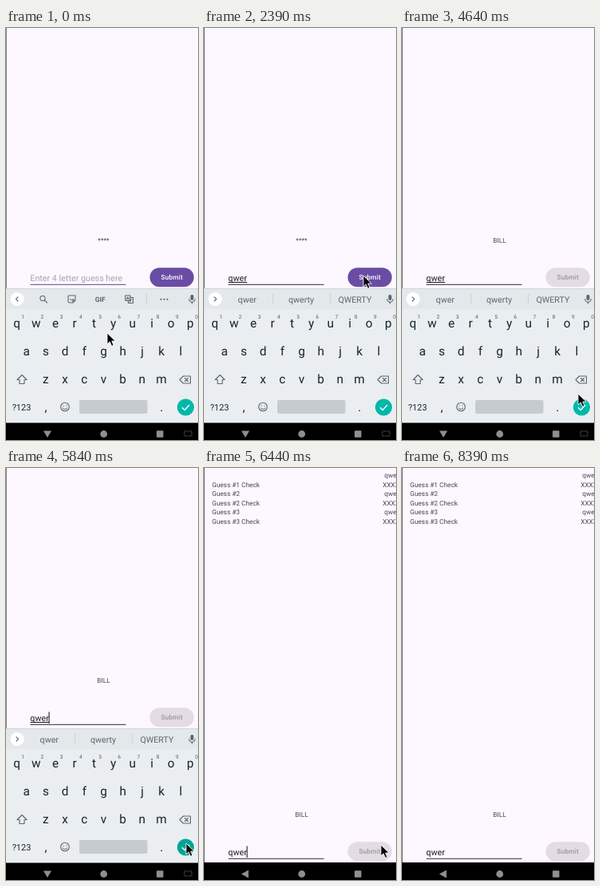
An HTML page that plays this animation: 241 by 516 pixels, repeating every 8540 ms.

```html
<!DOCTYPE html>
<html lang="en">
<head>
<meta charset="utf-8">
<title>Word guess</title>
<style>
html, body { margin: 0; width: 100%; height: 100%; overflow: hidden; background: #000; }
svg { display: block; width: 100vw; height: 100vh; }
text { font-family: Roboto, Arial, sans-serif; text-rendering: geometricPrecision; white-space: pre; }
.mid { text-anchor: middle; }
.small { font-size: 8.3px; fill: #49454f; }
.field { font-size: 10.75px; fill: #1d1b20; }
.key { font-size: 15.4px; fill: #12262f; }
.digit { font-size: 6.6px; fill: #4f5d65; }
.suggest { font-size: 10.7px; fill: #5b676e; }
.icon { fill: none; stroke: #5b676e; stroke-width: 1.1; stroke-linejoin: round; stroke-linecap: round; }
.solid { fill: #5b676e; }
.rule { stroke: #cbd2d6; stroke-width: 1; }
#nav { fill: #8f8f8f; }
</style>
</head>
<body>
<svg viewBox="0 0 241 516" preserveAspectRatio="none">
  <rect width="241" height="516"/>
  <g id="page">
    <rect y="-200" width="241" height="526" fill="#fdf7ff"/>
    <rect y="-200" width="1" height="526" fill="#85818a"/>
    <g id="list"></g>
    <text id="answer" class="small mid" x="122.5" y="269.2"></text>
    <text id="hint" class="field" x="30.3" y="317" style="fill:#a9a3ab">Enter 4 letter guess here</text>
    <text id="guess" class="field" x="30.3" y="317"></text>
    <rect id="compose" x="30.5" y="318" height="1" fill="#1d1b20"/>
    <rect id="caret" y="305.5" width="1.2" height="14.5" fill="#2e2936"/>
    <rect id="line" x="30.5" y="320.8" width="120" height="1.2"/>
    <rect id="button" x="180.5" y="300.3" width="55.3" height="24" rx="12"/>
    <text id="label" class="mid" x="208.2" y="315.2" font-size="8.4" font-weight="500" letter-spacing=".1">Submit</text>
  </g>
  <g id="board">
    <rect y="326.3" width="241" height="168.2" fill="#eaeef1"/>
    <rect y="326.3" width="241" height="26" fill="#e3e8eb"/>
    <circle cx="14" cy="339.5" r="8.6" fill="#fff"/>
    <path id="chevron" class="icon"/>
    <g id="tools">
      <circle class="icon" cx="46" cy="338.6" r="3.1"/>
      <path class="icon" d="M48.4 341l3.2 3.2"/>
      <path class="icon" d="M79.5 335h7.5v6l-3 3h-4.5q-1.5 0-1.5-1.5v-6q0-1.500 1.500-1.500zM87 341h-3v3M80.500 339.500q2 2.500 4 0"/>
      <text class="mid solid" x="118.2" y="342.6" font-size="8.6" font-weight="700">GIF</text>
      <rect class="icon" x="149.800" y="335" width="6" height="6.500"/>
      <path class="icon" d="M156 337.500h3.500v7h-6v-3M151.500 340l1.400-3 1.400 3M155.500 343l2-3.500"/>
      <path class="rule" d="M176.500 333v13"/>
      <circle class="solid" cx="194.500" cy="339.800" r="1.100"/>
      <circle class="solid" cx="198.500" cy="339.800" r="1.100"/>
      <circle class="solid" cx="202.500" cy="339.800" r="1.100"/>
    </g>
    <g id="words">
      <path class="rule" d="M86.500 333v13M158.500 333v13"/>
      <text class="suggest mid" x="54.300" y="343.700"></text>
      <text class="suggest mid" x="122" y="343.700"></text>
      <text class="suggest mid" x="189.500" y="343.700"></text>
    </g>
    <rect class="solid" x="231.500" y="334" width="4" height="7" rx="2"/>
    <path class="icon" d="M229.800 339.500a3.700 3.700 0 0 0 7.400 0M233.500 343.200v2"/>
    <g id="keys"></g>
    <path class="icon" d="M20 434.500l6 6h-3v5h-6v-5h-3z"/>
    <path class="icon" d="M222.500 436h9v9h-9l-4.500-4.500zM224.500 438.500l4 4M228.500 438.500l-4 4"/>
    <text class="mid key" x="19.500" y="479" style="font-size:11px">?123</text>
    <circle class="icon" cx="74" cy="474.500" r="5.300"/>
    <path class="icon" d="M71.500 476q2.500 3 5 0M72.200 472.800v.2M75.800 472.800v.2"/>
    <rect x="92" y="466" width="85.500" height="17" rx="2" fill="#c5cbcf"/>
    <g id="enter"></g>
  </g>
  <g id="nav">
    <path id="back"/>
    <circle cx="122.700" cy="508.500" r="4.400"/>
    <rect x="189" y="504.200" width="8.500" height="8.500" rx=".8"/>
    <path id="switch" d="M224 505h9v6h-9z" fill="none" stroke="#777" stroke-dasharray="1 1"/>
  </g>
  <path id="mouse" d="M0 0v14l3.300-3 2.400 5.400 2.400-1.100-2.300-5.200h4.500z" stroke="#fff" stroke-width=".9"/>
</svg>
<script>
const $ = id => document.getElementById(id);
const NS = 'http://www.w3.org/2000/svg';
const LOOP = 8540;

function add(parent, tag, attrs, text = '') {
  const el = document.createElementNS(NS, tag);
  for (const k in attrs) el.setAttribute(k, attrs[k]);
  el.textContent = text;
  parent.append(el);
  return el;
}
const set = (id, name, value) => $(id).setAttribute(name, value);
const show = (id, on) => { $(id).style.display = on ? '' : 'none'; };

// Key rows share one 24.2 px pitch
const rows = [['qwertyuiop', 13.6, 375], ['asdfghjkl', 25.8, 410], ['zxcvbnm', 49.8, 445.3]];
rows.forEach(([letters, x0, y], r) => [...letters].forEach((c, i) => {
  const x = x0 + i * 24.2;
  add($('keys'), 'text', { class: 'key mid', x, y }, c);
  if (!r) add($('keys'), 'text', { class: 'digit mid', x: x + 7.6, y: 363.5 }, (i + 1) % 10);
}));
[[',', 50], ['.', 195.2]].forEach(([c, x]) => add($('keys'), 'text', { class: 'key mid', x, y: 479.5 }, c));
const disc = add($('enter'), 'circle', { cx: 225.5, cy: 475, r: 10.6 });
add($('enter'), 'path', { d: 'M221 475.2l3.200 3.200 6-6.400', fill: 'none', stroke: '#fff', 'stroke-width': 1.4 });
const glow = add(document.querySelector('svg'), 'circle', { cx: 225.5, cy: 501.5, r: 10.6, fill: '#00a496', opacity: 0.55 });
$('nav').before(glow);

for (let i = 0; i < 6; i++) {
  const y = -156 + 11.55 * i, odd = i % 2;
  if (i) add($('list'), 'text', { class: 'small', x: 10, y }, `Guess #${(i + 1) >> 1}${odd ? ' Check' : ''}`.replace(/#(\d)$/, (m, n) => '#' + (+n + 1 - odd)));
  add($('list'), 'text', { class: 'small', x: odd ? 224.2 : 226.2, y }, odd ? 'XXXX' : 'qwer');
}
// Even rows hold the guesses themselves
[...$('list').children].filter(e => /^Guess #\d$/.test(e.textContent))
  .forEach((e, i) => { e.textContent = `Guess #${i + 2}`; });

// Each track lists [start time, value]
const typed = [[0, ''], [600, 'q'], [890, 'qw'], [1340, 'qwe'], [1640, 'qwer']];
const words = [[0, ''], [740, 'q a quite'], [1040, 'qw we QW'], [1340, 'qwe we owe'], [1640, 'qwer qwerty QWERTY']];
const carets = [[0, 0], [600, 1], [2240, 0], [2690, 1], [3140, 0], [3740, 1], [4190, 0], [4790, 1],
  [5240, 0], [5690, 1], [6590, 0], [7040, 1], [7490, 0], [7940, 1], [8390, 0]];
const shifts = [[0, 0], [5990, 160], [6140, 168]];
const buttons = [[0, ['#6a4ca5', '#fff']], [2540, ['#836bb5', '#fff']], [2690, ['#e3dce4', '#9c95a0']]];
const mouse = [[0, [127, 382]], [1790, [150, 352]], [1940, [185, 317]], [2090, [220, 296]], [2240, [207, 304]],
  [2390, [200, 310]], [4190, [201, 325]], [4340, [206, 370]], [4490, [213, 420]], [4640, [221, 458]],
  [4790, [227, 471]], [5240, [226, 470]], [6440, [222, 472]], [6590, [216, 476]], [6740, [207, 482]],
  [6890, [196, 492]], [7040, [181, 503]], [7190, [168, 512]], [7340, null]];

const at = (track, t) => track.reduce((v, [start, value]) => t >= start ? value : v, null);

function draw(t) {
  const text = at(typed, t), shift = at(shifts, t), picks = at(words, t);
  const closing = shift === 160;

  set('page', 'transform', `translate(0 ${shift})`);
  $('answer').textContent = t < 2690 ? '****' : 'BILL';
  show('hint', !text);
  $('guess').textContent = text;
  const width = text ? $('guess').getComputedTextLength() : 0;
  set('compose', 'width', width);
  show('compose', !shift);
  set('caret', 'x', 29.9 + width);
  show('caret', at(carets, t));
  set('line', 'fill', text ? '#514a60' : '#77659b');
  const [fill, ink] = at(buttons, t);
  set('button', 'fill', fill);
  set('label', 'fill', ink);

  show('board', t < 6140);
  set('board', 'transform', `translate(0 ${closing ? 26.5 : 0})`);
  set('board', 'opacity', closing ? 0.33 : 1);
  glow.style.display = closing ? '' : 'none';
  disc.setAttribute('fill', t < 5690 ? '#00b8a9' : '#00a496');
  set('chevron', 'd', picks ? 'M13 337l2.500 2.500-2.500 2.500' : 'M15 337l-2.500 2.500 2.500 2.500');
  show('tools', !picks);
  show('words', picks);
  const list = picks.split(' ');
  document.querySelectorAll('#words text').forEach((el, i) => { el.textContent = list[i] || ''; });

  set('back', 'd', shift ? 'M55.800 503.500v10l-9-5z' : 'M47 504.500h10l-5 8.500z');
  show('switch', !shift);
  const tip = at(mouse, t);
  show('mouse', tip);
  if (tip) set('mouse', 'transform', `translate(${tip})`);
}

const begin = performance.now();
function tick() {
  draw((performance.now() - begin) % LOOP);
  requestAnimationFrame(tick);
}
tick();
</script>
</body>
</html>
```
